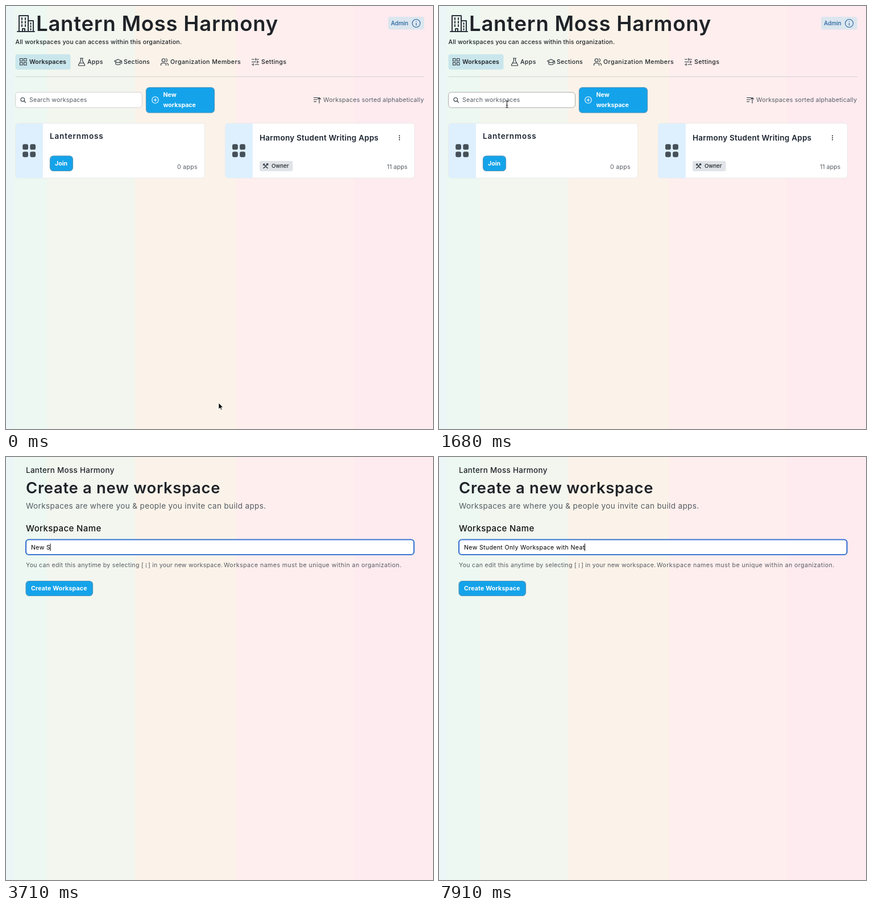
Write an HTML page that moves like this. It is 751 px wide and 745 px high and loops after 8000 ms.

```html
<!DOCTYPE html>
<html lang="en">
<head>
<meta charset="utf-8">
<title>New workspace</title>
<style>
html, body { margin: 0; width: 100%; height: 100%; overflow: hidden; }
body {
  background: linear-gradient(90deg,
    #edf6f7 14px, #ecf8f1 14px 72px, #f2f6ef 72px 227px, #fbf3e9 227px 404px,
    #feeeee 404px 612px, #fdebf0 612px);
}
svg { display: block; width: 751px; height: 745px; }
text { font: 450 10.6px Inter, "Open Sans", sans-serif; fill: #1f2328; white-space: pre; }
.semi { font-weight: 600; }
.bold { font-weight: 700; fill: #fff; }
.gray { font-weight: 400; fill: #555b62; }
.head { font-size: 13.5px; font-weight: 600; fill: #1b2430; }
.line { fill: none; stroke: #2b333b; stroke-width: 1.1; stroke-linecap: round; stroke-linejoin: round; }
.btn { fill: #14a3ea; stroke: #5596bb; stroke-width: 1.2; }
.field { fill: #fff; stroke: #d2d0d0; }
</style>
</head>
<body>
<svg viewBox="0 0 751 745">
  <defs>
    <g id="grid">
      <rect x="29.2" y="243.3" width="9.8" height="9.8" rx="3.2"/>
      <rect x="42.3" y="243.3" width="9.8" height="9.8" rx="3.2"/>
      <rect x="29.2" y="256.4" width="9.8" height="9.8" rx="3.2"/>
      <rect x="42.3" y="256.4" width="9.8" height="9.8" rx="3.2"/>
    </g>
    <g id="card">
      <rect x="16.5" y="206.5" width="333" height="96.5" rx="5" fill="#fff" stroke="#ece9ea"/>
      <path d="M65 207H22q-5 0-5 5v86q0 5 5 5h43z" fill="#def0fe"/>
      <use href="#grid" fill="#455058"/>
    </g>
  </defs>

  <g id="list">
    <g class="line" style="stroke-width:2">
      <path d="M20 45H50M23 45V17H39V45M39 26H48V45"/>
      <path d="M28 21v3M34 21v3M28 27v3M34 27v3M28 33v3M34 33v3M29 45v-5h4v5M43.5 30v2M43.5 35v2M43.5 40v2"/>
    </g>
    <text class="semi" x="53" y="44" style="font-size:36.5px;letter-spacing:.75px">Lantern Moss Harmony</text>
    <text x="16.5" y="67" letter-spacing=".19">All workspaces you can access within this organization.</text>

    <rect x="672" y="19" width="63.5" height="22.5" rx="4" fill="#dbe6ee"/>
    <text x="677" y="34" style="font-size:10px;fill:#23609f">Admin</text>
    <g class="line" style="stroke:#23609f"><circle cx="721.5" cy="30.5" r="7"/><path d="M721.5 30v4M721.5 27v.2"/></g>

    <rect x="16.5" y="85" width="97" height="27" rx="4" fill="#c9e6ec"/>
    <g class="line">
      <path d="M24.5 92.5h4.5v4.5h-4.5zM31.5 92.5h4.5v4.5h-4.5zM24.5 99.5h4.5v4.5h-4.5zM31.5 99.5h4.5v4.5h-4.5z"/>
      <path d="M130.5 92h5M131.5 92v4.5l-4 7q-.5 1.5 1 1.5h9q1.5 0 1-1.5l-4-7v-4.5M129.5 100.5h7"/>
      <path d="M190.5 97l6.5-3 6.5 3-6.5 3zM193 98.5v4q4 2 8 0v-4M203.5 97v4.5"/>
      <circle cx="277" cy="95.5" r="2.8"/>
      <path d="M272.5 104.5v-1.5q0-2.5 2.5-2.5h4q2.5 0 2.5 2.5v1.5M281.5 92.8q2 .7 2 2.7t-2 2.7M283 100.7q2.3.5 2.3 2.8v1"/>
      <path d="M432.5 94h4M439 94h5.5M432.5 98.5h7M442 98.5h2.5M432.5 103h2.5M438 103h6.5M439 92v4M442 96.5v4M435 101v4"/>
    </g>
    <text class="semi" x="41" y="102" letter-spacing=".1">Workspaces</text>
    <g letter-spacing=".34">
      <text x="143" y="102">Apps</text>
      <text x="207" y="102" letter-spacing=".26">Sections</text>
      <text x="289" y="102" letter-spacing=".44">Organization Members</text>
      <text x="449" y="102">Settings</text>
    </g>
    <path d="M16.5 124.5H736" stroke="#d5d3d3"/>

    <rect id="search" class="field" x="16.5" y="152" width="223" height="27" rx="5"/>
    <g class="line"><circle cx="29.3" cy="164.8" r="3.3"/><path d="M31.8 167.3l2.7 2.7"/></g>
    <text class="gray" x="41" y="169" letter-spacing=".16">Search workspaces</text>
    <rect class="btn" x="246.5" y="143.5" width="120" height="44.5" rx="6"/>
    <g class="line" style="stroke:#fff"><circle cx="262.5" cy="165.5" r="5.7"/><path d="M260 165.5h5M262.5 163v5"/></g>
    <text class="bold" x="276.5" y="160">New</text>
    <text class="bold" x="276.5" y="178">workspace</text>
    <path class="line" d="M541.5 161.5h7.5M541.5 165h5.5M541.5 168.5h4M551 171v-9.5M548.5 164l2.5-2.5 2.5 2.5"/>
    <text class="gray" x="558" y="169" letter-spacing=".24">Workspaces sorted alphabetically</text>

    <use href="#card"/>
    <use href="#card" x="368.8"/>
    <text class="head" x="77" y="234" letter-spacing=".85">Lanternmoss</text>
    <rect class="btn" x="77.5" y="264" width="40" height="26.5" rx="6"/>
    <text class="bold" x="86" y="281">Join</text>
    <text class="gray" x="337" y="287" text-anchor="end" letter-spacing=".3">0 apps</text>
    <text class="head" x="446" y="237" letter-spacing=".24">Harmony Student Writing Apps</text>
    <path d="M692 228.5v.1M692 232v.1M692 235.5v.1" stroke="#333" stroke-width="2.2" stroke-linecap="round"/>
    <rect x="446" y="273" width="58.5" height="18" rx="3" fill="#e0e4e9"/>
    <path class="line" d="M453 278.5l7 7M460 278.5l-7 7M452.5 280l2-2M458.5 278h2v2" style="stroke-width:1.5"/>
    <text x="467" y="285" style="font-size:9.6px">Owner</text>
    <text class="gray" x="706" y="287" text-anchor="end">11 apps</text>
  </g>

  <g id="form">
    <text x="35" y="27.5" style="font-size:13.4px;letter-spacing:.32px">Lantern Moss Harmony</text>
    <text class="semi" x="35" y="64" style="font-size:27.4px;letter-spacing:.7px">Create a new workspace</text>
    <text class="gray" x="35" y="91" style="font-size:13.6px;letter-spacing:.33px">Workspaces are where you &amp; people you invite can build apps.</text>
    <text x="35" y="131" style="font-size:15px;font-weight:500;fill:#111;letter-spacing:.38px">Workspace Name</text>
    <rect id="name" class="field" x="35" y="145.5" width="682.5" height="26.5" rx="5"/>
    <text id="hint" class="gray" x="44" y="162.5">e.g. "My Workspace"</text>
    <text id="typed" x="44" y="162.5" letter-spacing=".33" xml:space="preserve" style="font-weight:400;fill:#000"></text>
    <rect id="caret" y="152.5" width="1" height="13" fill="#000"/>
    <text class="gray" x="35" y="194" letter-spacing=".28">You can edit this anytime by selecting [</text>
    <path d="M246.5 188v.1M246.5 190.8v.1M246.5 193.6v.1" stroke="#474d55" stroke-width="1.6" stroke-linecap="round"/>
    <text class="gray" x="250" y="194" letter-spacing=".22">] in your new workspace.</text>
    <text class="gray" x="383" y="194" letter-spacing=".44">Workspace names must be unique within an organization.</text>
    <rect class="btn" x="35" y="218.5" width="117.5" height="26" rx="6"/>
    <text class="bold" x="44" y="235" letter-spacing=".16">Create Workspace</text>
  </g>

  <g id="pointer">
    <path id="arrow" d="M0 0v11l2.6-2.3 1.7 3.8 1.7-.8-1.7-3.6h3.4z" fill="#000" stroke="#fff" stroke-width=".8"/>
    <path id="hand" d="M-1 1q1-1.5 2 0v4l5 1q1 .5 1 2l-.8 4.5h-6l-3.7-4.5q-.5-1.5 1-1.2l1.5 1.2z" fill="#fff" stroke="#111"/>
    <path id="beam" d="M-2-6q2 0 2 1.5q0-1.5 2-1.5M0-5v10M-2 6q2 0 2-1.5q0 1.5 2 1.5M-1.3 2h2.6" fill="none" stroke="#111"/>
  </g>
</svg>
<script>
const LOOP = 8000, STEP = 70, SWAP = 1750, FOCUS = 2170, BLINK = 2730;
const phrase = "New Student Only Workspace with Neat";
// Time at which each character of the phrase appears
const keys = [
  2870, 3010, 3150, 3290,
  3710, 3850, 3920, 4060, 4130, 4270, 4340, 4480, 4550, 4690, 4900,
  5180, 5320, 5460, 5600, 5740, 5810,
  6300, 6370, 6440, 6510, 6580, 6720, 6790, 6860, 7000, 7070, 7140,
  7560, 7700, 7770, 7910
];
// Pointer path: time, x, y
const path = [
  [0, 374, 699], [1050, 300, 167], [1260, 293, 168], [1400, 258, 169],
  [1540, 186, 171], [1680, 119.5, 173], [1750, 97, 175], [1890, 90, 177],
  [2100, 90, 175], [2240, 90, 168]
];
const el = {};
document.querySelectorAll("[id]").forEach(e => el[e.id] = e);
const show = (e, on) => e.style.display = on ? "" : "none";
const smooth = u => u * u * (3 - 2 * u);

function pointerAt(t) {
  const i = path.findIndex(p => p[0] > t);
  if (i < 0) return path[path.length - 1].slice(1);
  const [t0, x0, y0] = path[i - 1], [t1, x1, y1] = path[i];
  const u = (t - t0) / (t1 - t0), k = i === 1 ? smooth(u) : u;
  return [x0 + (x1 - x0) * k, y0 + (y1 - y0) * k];
}

function render(time) {
  const t = Math.floor(time / STEP) * STEP;
  const form = t >= SWAP, focus = t >= FOCUS;
  show(el.list, !form);
  show(el.form, form);

  const [x, y] = pointerAt(t);
  const overSearch = !form && x > 17 && x < 240 && y > 152 && y < 179;
  const overButton = !form && x > 246 && x < 367 && y > 143 && y < 188;
  const beam = overSearch || (form && y < 172.5);
  el.pointer.setAttribute("transform", `translate(${x} ${y})`);
  show(el.pointer, t < keys[0]);
  show(el.arrow, !beam && !overButton);
  show(el.hand, overButton);
  show(el.beam, beam);
  el.search.style.stroke = overSearch ? "#aaa" : "";

  el.name.style.stroke = focus ? "#3b76d1" : "";
  el.name.style.strokeWidth = focus ? 2.2 : 1;
  const count = keys.filter(k => k <= t).length;
  el.typed.textContent = phrase.slice(0, count);
  show(el.hint, !count);
  show(el.caret, focus && (count > 0 || t < BLINK));
  if (form) el.caret.setAttribute("x", 43.5 + (count ? el.typed.getComputedTextLength() : 0));
}

const start = performance.now();
function tick() {
  render((performance.now() - start) % LOOP);
  requestAnimationFrame(tick);
}
tick();
</script>
</body>
</html>
```
